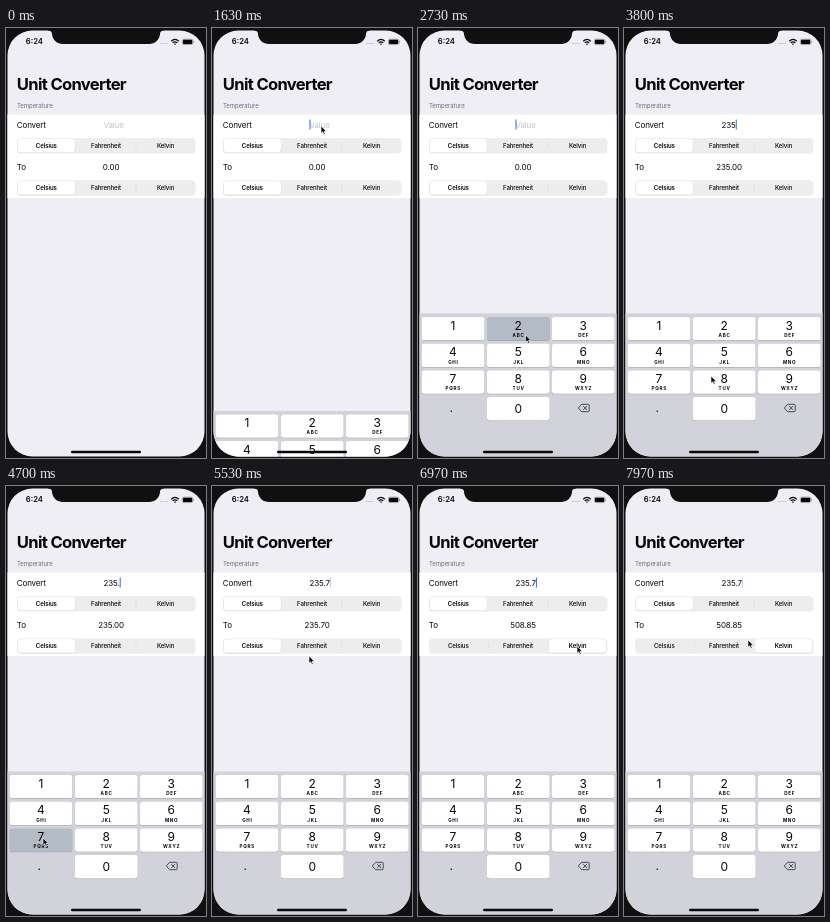
These frames come from a looping animation (200x430 px, 8 s). An HTML page:

```html
<!DOCTYPE html>
<html lang="en">
<head>
<meta charset="utf-8">
<title>Unit Converter</title>
<style>
html, body { margin: 0; width: 100%; height: 100%; overflow: hidden; background: #101011; }
svg { display: block; width: 200px; height: 430px; }
text { font-family: Inter, "Liberation Sans", sans-serif; fill: #080809; }
.title { font-size: 16.6px; font-weight: 700; letter-spacing: -.68px; }
.body { font-size: 8px; letter-spacing: -.15px; }
.section { font-size: 6px; letter-spacing: -.05px; fill: #6f6f75; }
.clock { font-size: 7.7px; font-weight: 600; letter-spacing: 0; }
.seg { font-size: 6.1px; font-weight: 500; letter-spacing: -.1px; }
.seg.on { font-weight: 600; }
.digit { font-size: 12px; }
.letters { font-size: 4.6px; font-weight: 700; letter-spacing: .7px; }
.mid { text-anchor: middle; }
</style>
</head>
<body>
<svg id="stage" viewBox="0 0 200 430">
  <defs>
    <clipPath id="screenClip"><rect x="1.5" y="2.5" width="197" height="426" rx="25"/></clipPath>
  </defs>
  <rect width="200" height="430" fill="#101011"/>
  <g clip-path="url(#screenClip)">
    <rect width="200" height="430" fill="#efeef5"/>
    <text class="title" x="10.8" y="62">Unit Converter</text>
    <text class="section" x="11" y="80">Temperature</text>
    <rect y="86.5" width="200" height="83.5" fill="#fff"/>
    <text class="body" x="10.8" y="99.7">Convert</text>
    <text class="body" id="field" x="97.5" y="99.5"></text>
    <rect id="caret" x="97.4" y="91.5" width="1.1" height="10" fill="#3f78e8"/>
    <text class="body" x="10.8" y="141.8">To</text>
    <text class="body mid" id="output" x="105.1" y="141.8"></text>
    <g id="segments"></g>
    <g id="keyboard"><rect y="285.5" width="200" height="146" fill="#d1d2da"/></g>
    <rect x="65" y="422.7" width="70" height="2.5" rx="1.25" fill="#080809"/>
  </g>
  <path d="M42 0V2.5Q46 2.5 46 6C46.5 12 51 16 57 16H143C149 16 153.5 12 154 6Q154 2.5 158 2.5V0Z" fill="#101011"/>
  <text class="clock mid" x="28.4" y="16.4">6:24</text>
  <path d="M154 15.5h8" stroke="#b9b9be" stroke-width="1.2" stroke-dasharray="1.3 .9"/>
  <g fill="none" stroke="#080809" stroke-width="1.2">
    <path d="M165.2 13.2Q169 9.7 172.8 13.2M166.7 14.8Q169 12.8 171.3 14.8"/>
    <path d="M168.3 16.2h1.4"/>
  </g>
  <rect x="176.4" y="11.2" width="10.4" height="5.4" rx="1.5" fill="none" stroke="#6c6c72" stroke-width=".6"/>
  <rect x="177" y="11.8" width="9.2" height="4.2" rx=".9" fill="#080809"/>
  <path d="M187.6 13v1.8" stroke="#8c8c92" stroke-width=".7"/>
  <path id="cursor" d="M0 0V7.3L1.7 5.8L2.8 8.3L4.1 7.7L3 5.3H5.3Z" fill="#0b0b0c" stroke="#fff" stroke-width=".6" stroke-linejoin="round"/>
</svg>
<script>
const LOOP = 8000, FOCUS = 1560, SLIDE = 400, KEYBOARD_HEIGHT = 144;
const UNITS = ['Celsius', 'Fahrenheit', 'Kelvin'];
const CENTERS = [40.3, 100, 159.6];
const COLS = [3.7, 69, 134];

// Key taps: label, press time, release time
const TAPS = [
  ['2', 2680, 2790], ['3', 3120, 3200], ['5', 3540, 3620],
  ['.', 4180, 4260], ['7', 4690, 4770]
];
// Output unit choices: time, unit index
const CHOICES = [[0, 0], [5880, 1], [6620, 2]];
// Pointer tip: time, x, y
const POINTER = [
  [600, 201, 210], [1250, 109, 98], [1720, 109, 98], [2540, 107.5, 307],
  [2800, 107.5, 307], [3080, 160, 301], [3200, 160, 301], [3500, 103, 327],
  [3620, 103, 327], [3800, 87, 348], [4130, 34, 379], [4290, 34, 379],
  [4620, 37, 352], [4830, 37, 352], [5530, 97, 170], [5800, 99, 160],
  [6060, 99, 160], [6540, 159, 160], [7150, 159, 160], [7970, 124, 154]
];

const $ = id => document.getElementById(id);
const clamp = v => Math.max(0, Math.min(1, v));
const smooth = v => v * v * (3 - 2 * v);
const mix = (a, b, p) => a + (b - a) * p;

function add(parent, tag, attrs, content = '') {
  const el = document.createElementNS('http://www.w3.org/2000/svg', tag);
  for (const name in attrs) el.setAttribute(name, attrs[name]);
  el.textContent = content;
  parent.append(el);
  return el;
}

function makeSegments(y) {
  const g = add($('segments'), 'g', { transform: `translate(0 ${y})` });
  add(g, 'rect', { x: 11, width: 178.5, height: 15.5, rx: 4, fill: '#ededee' });
  const dividers = [70.3, 130].map(x =>
    add(g, 'rect', { x: x - .25, y: 4, width: .5, height: 7.5, fill: '#d6d6da' }));
  const thumb = add(g, 'g', {});
  add(thumb, 'rect', { x: -28.9, y: 1.4, width: 57.8, height: 13.7, rx: 3.6, fill: '#d6d6da' });
  add(thumb, 'rect', { x: -28.6, y: 1, width: 57.2, height: 13.5, rx: 3.4, fill: '#fff' });
  const labels = UNITS.map((unit, i) =>
    add(g, 'text', { class: 'seg mid', x: CENTERS[i], y: 10.1 }, unit));
  return (unit, x) => {
    thumb.setAttribute('transform', `translate(${x} 0)`);
    labels.forEach((label, i) => label.classList.toggle('on', i === unit));
    dividers.forEach((d, i) => d.setAttribute('opacity', unit === i || unit === i + 1 ? 0 : 1));
  };
}

const keys = {};
function makeKey(label, letters, col, row) {
  const x = COLS[col], y = 289 + row * 26.7, plain = label === '.';
  const box = { x, width: 62.6, height: 23.3, rx: 2.6 };
  if (!plain) add($('keyboard'), 'rect', { ...box, y: y + .6, fill: '#a0a1a8' });
  const idle = plain ? 'none' : '#fff';
  const face = add($('keyboard'), 'rect', { ...box, y, fill: idle });
  const baseline = y + (letters || label === '1' ? 12.5 : 15.4);
  add($('keyboard'), 'text', {
    class: 'digit mid', x: x + (plain ? 29.5 : 31.2), y: baseline - (plain ? .8 : 0)
  }, label);
  add($('keyboard'), 'text', { class: 'letters mid', x: x + 31.6, y: y + 20 }, letters);
  keys[label] = { face, idle, pressed: plain ? '#fff' : '#b3bbc7' };
}

['', 'ABC', 'DEF', 'GHI', 'JKL', 'MNO', 'PQRS', 'TUV', 'WXYZ'].forEach((letters, i) =>
  makeKey(String(i + 1), letters, i % 3, Math.floor(i / 3)));
makeKey('.', '', 0, 3);
makeKey('0', '', 1, 3);
add($('keyboard'), 'path', {
  d: 'M160.3 380l3.3-3.7h6.6q1 0 1 1v5.4q0 1-1 1h-6.6ZM165.2 378.1l3.8 3.8M169 378.1l-3.8 3.8',
  fill: 'none', stroke: '#202024', 'stroke-width': .75, 'stroke-linejoin': 'round'
});

const setInput = makeSegments(110);
const setOutput = makeSegments(152.3);
setInput(0, CENTERS[0]);

function convert(celsius, unit) {
  return [celsius, celsius * 1.8 + 32, celsius + 273.15][unit].toFixed(2);
}

function caretOpacity(t, since) {
  const phase = (t - since) % 1100;
  return phase < 950 ? 1 - clamp((phase - 600) / 250) : clamp((phase - 950) / 150);
}

function movePointer(t) {
  const cursor = $('cursor');
  cursor.setAttribute('visibility', t < POINTER[0][0] ? 'hidden' : 'visible');
  const next = POINTER.findIndex(p => p[0] > t);
  if (next === 0) return;
  const b = POINTER[next < 0 ? POINTER.length - 1 : next];
  const a = next < 0 ? b : POINTER[next - 1];
  const p = a === b ? 0 : smooth((t - a[0]) / (b[0] - a[0]));
  cursor.setAttribute('transform', `translate(${mix(a[1], b[1], p)} ${mix(a[2], b[2], p)})`);
}

function render(t) {
  const typed = TAPS.filter(tap => t >= tap[2]);
  const value = typed.map(tap => tap[0]).join('');
  const field = $('field');
  field.textContent = value || 'Value';
  field.style.fill = value ? '' : '#c4c4c9';

  const caret = $('caret');
  const since = typed.length ? typed[typed.length - 1][2] : FOCUS;
  caret.setAttribute('x', value ? 97.6 + field.getComputedTextLength() : 97.4);
  caret.setAttribute('opacity', t < FOCUS ? 0 : caretOpacity(t, since));

  for (const [label, press, release] of TAPS) {
    const key = keys[label];
    key.face.setAttribute('fill', t >= press && t < release ? key.pressed : key.idle);
  }

  const slide = 1 - (1 - clamp((t - FOCUS) / SLIDE)) ** 2;
  $('keyboard').setAttribute('transform', `translate(0 ${KEYBOARD_HEIGHT * (1 - slide)})`);

  const past = CHOICES.filter(c => t >= c[0]);
  const [time, unit] = past[past.length - 1];
  const from = past.length > 1 ? past[past.length - 2][1] : unit;
  setOutput(unit, mix(CENTERS[from], CENTERS[unit], smooth(clamp((t - time) / 250))));
  $('output').textContent = convert(Number(value), unit);

  movePointer(t);
}

function frame() {
  render(performance.now() % LOOP);
  requestAnimationFrame(frame);
}
frame();
</script>
</body>
</html>
```
